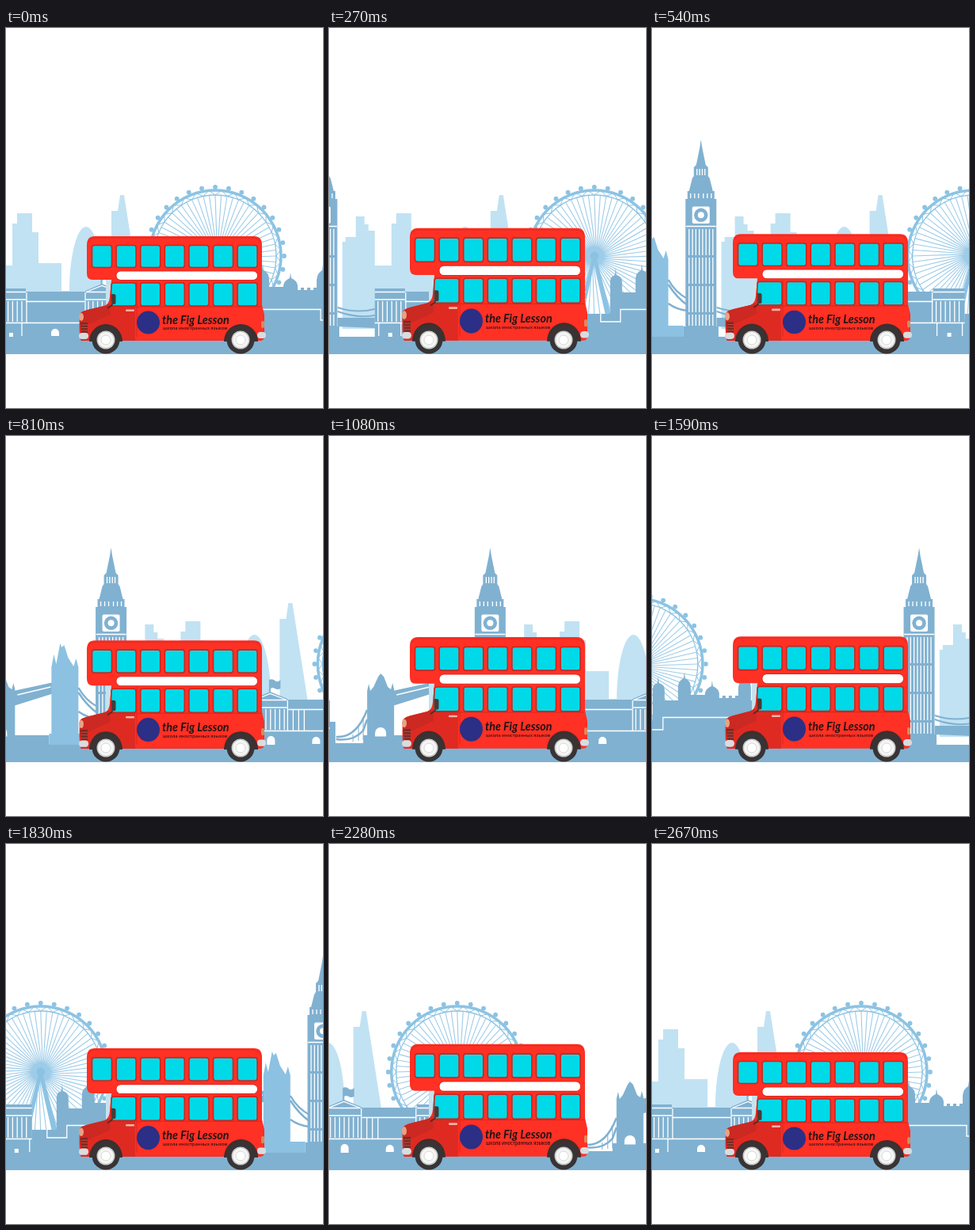
An HTML page that plays this animation: 400 by 480 pixels, repeating every 2.7 s.

```html
<!DOCTYPE html>
<html lang="en">
<head>
<meta charset="utf-8">
<title>City bus</title>
<style>
  html, body { margin: 0; width: 100%; height: 100%; overflow: hidden; background: #fff; }
  svg { display: block; width: 400px; height: 480px; }
  .far { fill: #c1e2f3; }
  .near { fill: #80b1d1; }
  .bridge { fill: #8cc1e2; }
  .line { fill: none; stroke: #80b1d1; }
  .gap { fill: none; stroke: #fff; stroke-width: 1.3; }
  .wheel { fill: none; stroke: #8cc3e3; }
  .red { fill: #ff3024; }
  .glass { fill: #00d9e8; stroke: #c9271f; stroke-width: 1.6; }
  .name { font: italic 700 14.3px Lato, "Open Sans", sans-serif; fill: #1d1414; }
  .sub { font: 600 5.7px "Open Sans", "Noto Sans", sans-serif; fill: #3a1010; }
</style>
</head>
<body>
<svg viewBox="0 0 400 480">
  <defs>
    <g id="city">
      <!-- distant skyline -->
      <path class="far" d="M-54 400V270H-50V264H-37V238H-26V248H-21V256H-13V300H8V247H14V234H33V258H41V297H70V332H80C80 290 89 251 101 251S122 290 122 332H133V231H141L144 211H149L159 275L168 332V400H-13V380H-54Z"/>

      <!-- observation wheel -->
      <g class="wheel" transform="translate(264 288)">
        <path id="spokes" stroke="#9dcce8" stroke-width="1.1"/>
        <circle r="83" stroke-width="3.600"/>
        <circle r="77" stroke-width="1.4"/>
        <path id="truss" stroke-width="1"/>
        <path d="M-2 0H2L22 78H15L0 10L-15 78H-22Z" fill="#8cc3e3" stroke="none"/>
        <circle r="5" fill="#8cc3e3"/>
        <g id="pods" fill="#8cc3e3" stroke="none"/>
      </g>

      <!-- ground line -->
      <path class="near" d="M-284 412V361H-275V388H-240V378H-158V389H-102V377H-58V390H-13V372H253V361H418V412Z"/>

      <!-- castle -->
      <path class="near" d="M284 362V320Q284 314 290 312L291 303L292 312Q299 314 299 320V334H316V318Q316 309 323 306L324 298L325 306Q332 309 332 318V327H350V325Q351 319 358 316L359 309L360 316Q367 319 368 325V331h4v-3h4v3h4v-3h4v3h4v-3h4v3V318Q393 309 399 306L400 299L401 306Q408 309 408 318V334H418V362Z"/>
      <path class="gap" d="M272 361V371H297V355.5H397V369H418"/>

      <!-- drawbridge -->
      <g transform="translate(-218 0)">
        <path class="near" d="M-20 380V378H-17V322L-15 313L-13 322L-9 317L-3 304L0 300L4 304L9 317L13 320L15 312L17 320V380Z"/>
        <path d="M-7 379.500V375a7 7 0 0 1 14 0V379.500Z" fill="#fff"/>
        <path class="near" d="M15 322L66 311V325L15 341Z"/>
        <path class="gap" d="M20 327L62 317" stroke-width=".8"/>
        <path class="line" stroke-width="2.500" d="M-17 346Q-31 382 -56 380M-17 358L-22 372Q-34 386 -56 383"/>
        <path class="line" d="M-28 366V385M-35 377V386M-22 355V384"/>
      </g>
      <path class="bridge" d="M-158 390V376H-155V292L-152 276L-149 288L-144 262L-142 267L-139 264L-134 280L-127 291L-124 281L-121 292V376H-102V390Z"/>
      <path class="line" stroke-width="2.500" d="M-121 318Q-112 334 -97 342M-121 324Q-110 341 -97 350M-121 348Q-110 356 -97 357"/>
      <path class="line" stroke-width="2" d="M-60 353Q-36 361 -13 355M-60 358Q-36 367 -13 363"/>
      <path class="near" d="M-60 366H-13V379L-60 377Z"/>

      <!-- clock tower -->
      <g transform="translate(-79.800 0)">
        <path class="near" d="M0 141L1.500 151L6 173L9 176V187L11 190L15 206H17V216H19.500V377H22V400H-22V377H-19.500V216H-17V206H-15L-11 190L-9 187V176L-6 173L-1.500 151Z"/>
        <path class="gap" stroke-width="1" d="M-5 178v8M-1.700 178v8M1.700 178v8M5 178v8M-13 209v6M-8 209v6M-3 209v6M3 209v6M8 209v6M13 209v6M-19 250.500H19"/>
        <rect x="-11" y="225.500" width="22" height="21.500" rx="2" fill="#fff"/>
        <circle class="near" cy="236.300" r="8.700"/>
        <circle cy="236.300" r="4" fill="#fff"/>
        <path class="gap" stroke-width="1.100" stroke-dasharray="33 3" d="M-15 254V376M-10.700 254V376M-6.400 254V376M-2.100 254V376M2.100 254V376M6.400 254V376M10.700 254V376M15 254V376"/>
      </g>

      <!-- gallery -->
      <path class="near" d="M-13 373V329H25V333H100V332L121 323L143 332V333H213V329H253V373Z"/>
      <path class="near" d="M119.500 324V308Q124 306 127 309T134 308V319Q130 321 127 319T121.500 319V324Z"/>
      <path class="gap" d="M-13 333.500H25M-13 343H25M213 333.500H253M213 343H253M25 345.500H99M144 345.500H213M-13 372.500H253M101 333.500H142L121 325.500ZM101 343H142M26 334V372M100 334V372M143 334V372M212 334V372M150 346V372M157 346V372M164 346V372M-8 372V389M20 372V389M218 372V389M250 372V389"/>
      <path id="columns" class="gap" stroke-width="2.400"/>
      <path d="M57 389v-4a5 5 0 0 1 10 0v4ZM117 390v-6a5 5 0 0 1 10 0v6ZM174 389v-4a5 5 0 0 1 10 0v4ZM4 385h5v5h-5ZM231 385h5v5h-5Z" fill="#fff"/>
    </g>
  </defs>

  <g id="scene">
    <use href="#city"/>
    <use href="#city" x="-700"/>
  </g>

  <g id="body">
    <path d="M126 317H136L133 350H126Z" fill="#c4e3ee"/>
    <path class="red" d="M112 263H313Q323 263 323 274V350L326 362V390Q326 395 320 395H95Q92 392 93 362Q94 358 103 356L124 351Q130 349 131 340L133 318H109Q102 318 102 310V274Q102 263 112 263Z"/>
    <path d="M131 351H163V395H95Q92 392 93 362Z" fill="#df2a22"/>
    <path d="M93 362Q94 358 103 356L124 351L131 348L132 362L105 374H93Z" fill="#cb2921"/>
    <path d="M104 270Q106 265 114 265H312Q319 265 321 271" fill="none" stroke="#e2291f"/>
    <path d="M165 320V390M131 352H322" fill="none" stroke="#d3261e"/>
    <rect x="139" y="307" width="178.500" height="11.500" rx="5.500" fill="#fff" stroke="#e2291f"/>
    <g id="panes" class="glass"/>
    <path class="glass" d="M136 322H161Q164 322 164 325V348Q164 351 161 351H135Q132 351 132 347L133 325Q133 322 136 322Z"/>
    <path d="M134 336V350L128 354" fill="none" stroke="#4a2926" stroke-width="1.500"/>
    <rect x="133.500" y="336" width="5" height="13" rx="2.500" fill="#4a3936"/>
    <rect x="151" y="355.500" width="11" height="2.500" rx="1" fill="#f3b3a8"/>
    <ellipse cx="95" cy="365" rx="3" ry="5" fill="#e9a184"/>
    <path d="M94 372H103V385H95Z" fill="#7b2a24"/>
    <path d="M95 375H103M95 378.500H103M95 382H103" stroke="#c4493d"/>
    <path d="M105 396A21 22 0 0 1 147 396ZM275 396A21.500 22 0 0 1 318 396Z" fill="#3f2f2e"/>
    <rect x="92" y="385" width="12" height="8" rx="4" fill="#d9dcdf"/>
    <rect x="317" y="384" width="11" height="8" rx="4" fill="#d9dcdf"/>
    <rect x="322" y="370" width="4" height="9" rx="2" fill="#d98a5c"/>
    <circle cx="179.500" cy="372" r="14.500" fill="#2b2f86"/>
    <text class="name" x="197" y="374">the Fig Lesson</text>
    <text class="sub" x="198" y="381.500">школа иностранных языков</text>
  </g>

  <g id="tyres"></g>
</svg>

<script>
  const $ = id => document.getElementById(id);
  const list = (n, f) => Array.from({ length: n }, (_, i) => f(i)).join('');
  const polar = (r, a) => `${(r * Math.cos(a)).toFixed(2)} ${(r * Math.sin(a)).toFixed(2)}`;
  const TAU = 2 * Math.PI;

  // Observation wheel
  const PODS = 32, pod = TAU / PODS;
  $('spokes').setAttribute('d', list(PODS * 2, i => `M${polar(3, i * pod / 2 + 1)}L${polar(77, i * pod / 2)}`));
  $('truss').setAttribute('d', list(PODS * 2, i => (i ? 'L' : 'M') + polar(i % 2 ? 83 : 77, i * pod / 2)) + 'Z');
  $('pods').innerHTML = list(PODS, i => {
    const [x, y] = polar(87, i * pod).split(' ');
    return `<circle cx="${x}" cy="${y}" r="2.900"/>`;
  });

  // Gallery porticos: first column and count
  $('columns').setAttribute('d', [[-9, 6], [104, 7], [217, 6]]
    .map(([x, n]) => list(n, i => `M${x + i * 5.8} 345V371`)).join(''));

  // Bus windows and tyres
  const pane = (i, y, h) =>
    `<rect x="${108.5 + i * 30.6}" y="${y}" width="25" height="${h}" rx="3"/>`;
  $('panes').innerHTML = list(7, i => pane(i, 274.5, 28)) + list(5, i => pane(i + 2, 322, 29));
  $('tyres').innerHTML = [126, 296].map(x => `<g transform="translate(${x} 394)">
    <circle r="17.500" fill="#383435"/><circle r="11.500" fill="#c9cbcd"/>
    <circle r="10" fill="#f5f5f3"/><circle r="6" fill="#fff" stroke="#d8d8d6"/></g>`).join('');

  // 90 steps of 30 ms: one city length and four bounces over 89 of them
  const STEP = 30, LAST = 89, FLOOR = 398;
  const start = performance.now();
  function draw() {
    const k = Math.floor((performance.now() - start) / STEP) % (LAST + 1);
    const lift = 0.5 + 0.5 * Math.cos(TAU * (4 * k / LAST - 0.48));
    $('scene').setAttribute('transform', `translate(${700 * k / LAST} 0)`);
    $('body').setAttribute('transform',
      `translate(0 ${FLOOR}) scale(1 ${1 + 0.08 * lift}) translate(0 ${-FLOOR})`);
    requestAnimationFrame(draw);
  }
  draw();
</script>
</body>
</html>
```
